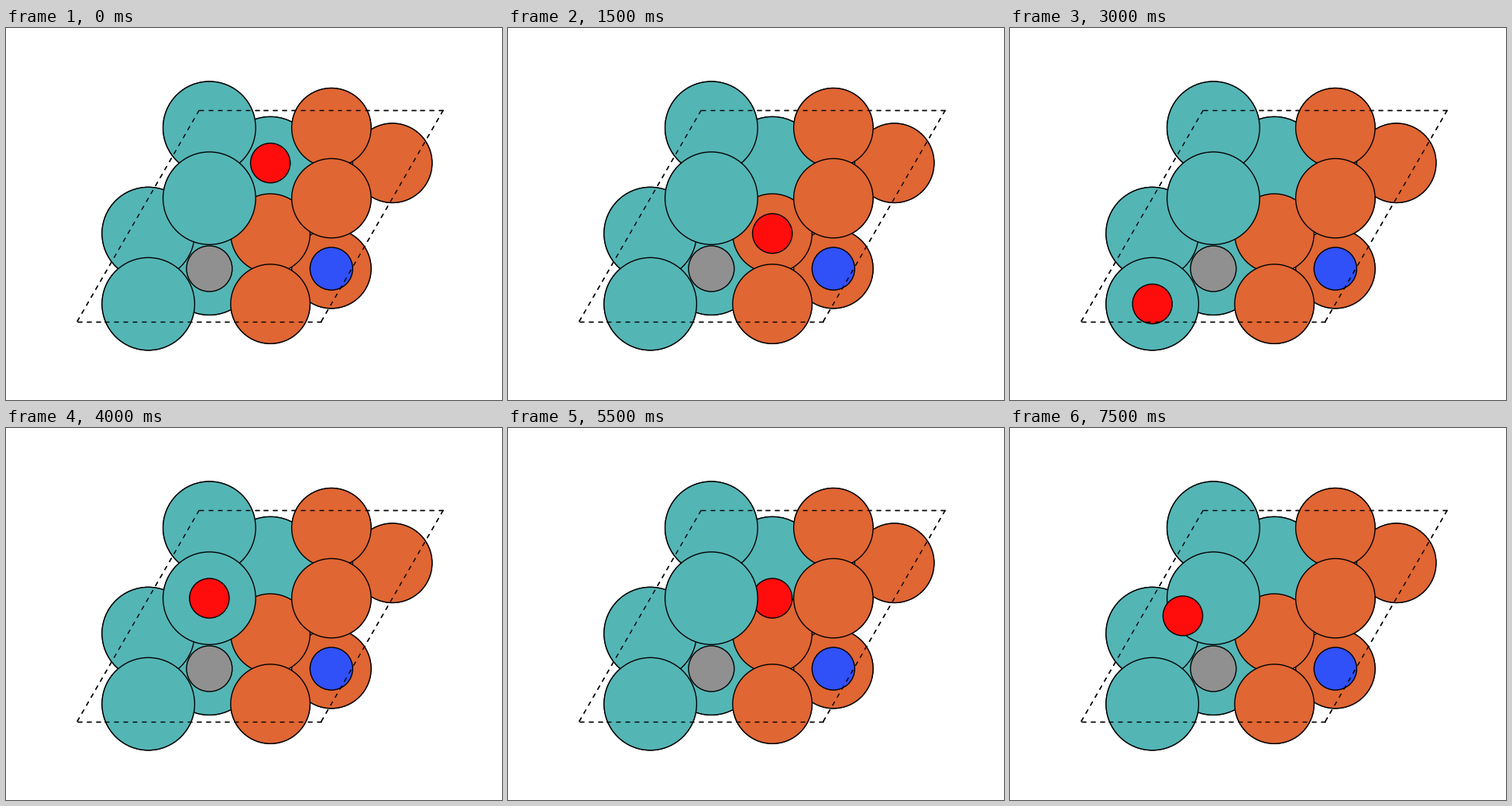
Recreate the animation shown at these times as a matplotlib script. Size 640 by 480 pixels, loop 8000 ms.

```python
import numpy as np
import matplotlib.pyplot as plt
from matplotlib.animation import FuncAnimation
from matplotlib.patches import Circle, PathPatch
from matplotlib.path import Path

W, H = 640, 480
CENTER = np.array([328, 242.4])
CELL_WIDTH = 496 / 1.05
A = CELL_WIDTH / 1.5                  # cell edge, px
SCALE = A / (2 * 2.87 * np.sqrt(2))   # px per angstrom
STEP_X = A / 4
STEP_Y = A * np.sqrt(3) / 12

# Element: covalent radius, colour
ELEMENTS = {
    "Mo": (1.54, "#54b5b5"),
    "Fe": (1.32, "#e06633"),
    "C": (0.76, "#909090"),
    "N": (0.71, "#3050f8"),
    "O": (0.66, "#ff0d0d"),
}

# Slab layers from bottom to top: (column, row, element)
LAYERS = [
    [(2, 4, "Mo"), (4, 4, "Fe"), (1, 1, "Mo"), (3, 1, "Fe")],
    [(1, 5, "Mo"), (3, 5, "Fe"), (0, 2, "Mo"), (2, 2, "Fe")],
    [(1, 3, "Mo"), (3, 3, "Fe"), (0, 0, "Mo"), (2, 0, "Fe")],
]

# Adsorption sites visited by the oxygen: (column, row)
SITES = [
    (2, 4), (4, 4), (0, 2), (2, 2), (1, 5), (3, 5), (0, 0), (2, 0),
    (1, 3), (3, 3), (2, 1), (2, 3), (1.5, 3.5), (1.5, 2.5), (0, 3), (0.5, 2.5),
]
LOW_SITES = {(2, 3), (0, 3)}          # these lie below the top layer

corner = CENTER + [-CELL_WIDTH / 2, 3 * STEP_Y]
vec_a = np.array([A, 0])
vec_b = np.array([A / 2, -6 * STEP_Y])
origin = corner + [7 * A / 24, -STEP_Y / 2]
# keep the slab centred vertically
origin[1] = CENTER[1] + 2.5 * STEP_Y
corner[1] = origin[1] + STEP_Y / 2


def place(col, row):
    return origin + [col * STEP_X, -row * STEP_Y]


def add_atom(col, row, element, z):
    radius, color = ELEMENTS[element]
    atom = Circle(place(col, row), radius * SCALE, facecolor=color,
                  edgecolor="black", linewidth=1, zorder=z)
    return ax.add_patch(atom)


def add_cell(z, dashes=27):
    for vec, other in ((vec_a, vec_b), (vec_b, vec_a)):
        half = vec / (4 * dashes - 2)
        for start in (corner, corner + other):
            for k in range(dashes):
                mid = start + (4 * k + 1) * half
                ax.add_patch(PathPatch(Path([mid + half, mid - half]),
                                       edgecolor="black", linewidth=1, zorder=z))


fig = plt.figure(figsize=(W / 100, H / 100), dpi=100, facecolor="white")
ax = fig.add_axes([0, 0, 1, 1])
ax.set_xlim(0, W)
ax.set_ylim(H, 0)
ax.axis("off")

add_cell(0)
for z, layer in enumerate(LAYERS * 2, start=1):
    for col, row, element in layer:
        add_atom(col, row, element, z)
add_atom(1, 1, "C", 7)
add_atom(3, 1, "N", 7)
oxygen = add_atom(*SITES[0], "O", 8)
add_cell(9)


def update(i):
    site = SITES[i]
    oxygen.center = place(*site)
    oxygen.set_zorder(5.5 if site in LOW_SITES else 8)
    return [oxygen]


anim = FuncAnimation(fig, update, frames=len(SITES), interval=500,
                     repeat=True, repeat_delay=0)
plt.show()
```
